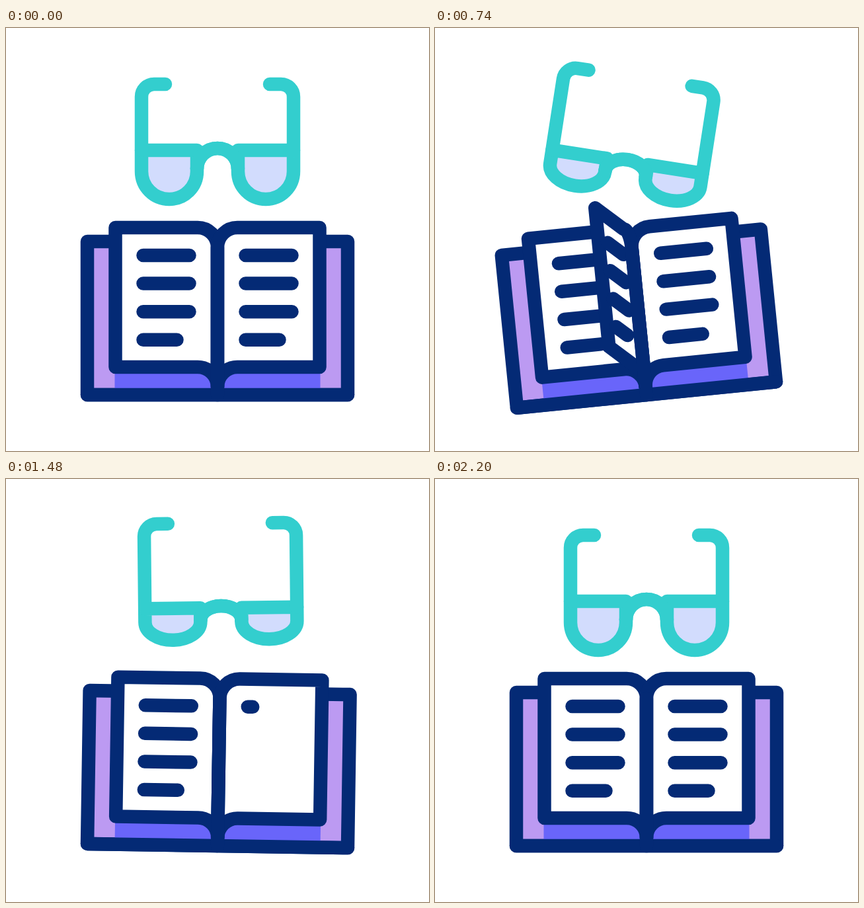
Recreate the animation shown at these times as an HTML page. Size 640 px wide and 640 px high, loop 2400 ms.

```html
<!DOCTYPE html>
<html>
<head>
<meta charset="utf-8">
<title>Book and glasses</title>
<style>
html, body { margin: 0; height: 100%; overflow: hidden; background: #fff; }
svg { display: block; width: 100vw; height: 100vh; }
path { stroke-width: 20.5; stroke-linecap: round; stroke-linejoin: round; fill: none; }
#book path { stroke: #042a75; }
#glasses path { stroke: #33cece; }
#book .paper { fill: #fff; }
#glasses #lens { fill: #d2dcfd; }
</style>
</head>
<body>
<svg viewBox="0 0 640 640">
  <g id="book">
    <path d="M123 323H517V555H123Z" fill="#bc9af2" style="fill:#bc9af2"/>
    <rect x="164.5" y="500" width="311" height="55" fill="#6965fa"/>
    <path d="M123 555H517"/>
    <path id="left" class="paper"/>
    <path id="right" class="paper"/>
    <path id="leftText"/>
    <path id="rightText"/>
    <path id="flap" class="paper"/>
    <path id="flapText"/>
    <path d="M320 332V555"/>
  </g>
  <g id="glasses">
    <g id="half">
      <path id="lens"/>
      <path id="frame"/>
    </g>
    <use href="#half" transform="scale(-1 1)"/>
  </g>
</svg>
<script>
const $ = id => document.getElementById(id);
const draw = (id, d) => $(id).setAttribute('d', d);
const clamp = u => Math.min(1, Math.max(0, u));
const smooth = u => u * u * (3 - 2 * u);
const ramp = (t, a, b) => smooth(clamp((t - a) / (b - a)));

// Eased value between keys placed at the given times
function keys(t, times, values) {
  return times.slice(1).reduce(
    (v, end, i) => v + (values[i + 1] - values[i]) * ramp(t, times[i], end), values[0]);
}

// Page point at distance d from the spine; turn runs from -1 (left) to 1 (right)
function point(turn, d, y) {
  const lift = Math.max(0, d - 30) / 124.5 * 53 * (1 - Math.abs(turn));
  return (320 + d * turn).toFixed(2) + ' ' + (y - lift).toFixed(2) + ' ';
}

function page(turn) {
  const p = (d, y) => point(turn, d, y);
  return 'M' + p(154.5, 302) + 'L' + p(30, 302) +
    'C' + p(13.4, 302) + p(0, 315.4) + p(0, 332) + 'L' + p(0, 543) +
    'C' + p(0, 526.4) + p(13.4, 513) + p(30, 513) + 'L' + p(154.5, 513) + 'Z';
}

// Four text lines; grow gives the drawn share of each
function text(turn, grow = () => 1) {
  const start = turn < 0 ? 112.5 : 42.5, dir = turn < 0 ? -1 : 1;
  return [70, 70, 70, 51].map((length, i) => {
    const share = grow(i), y = 344 + i * 42.6;
    if (share <= 0) return '';
    return 'M' + point(turn, start, y) + 'L' + point(turn, start + dir * length * share, y);
  }).join('');
}

function drawBook(t) {
  const angle = keys(t, [200, 700, 1200, 1700, 2200], [0, -6, 8, -4, 0]);
  $('book').setAttribute('transform', `rotate(${angle} 320 555)`);
  const turn = clamp((t - 400) / 1000) * 2 - 1;
  const turning = turn > -1 && turn < 1;
  draw('flap', turning ? page(turn) : '');
  draw('flapText', turning && turn < 0 ? text(turn) : '');
  draw('rightText', t < 1400 ? text(1) : text(1, i => ramp(t, 1400 + i * 100, 1800 + i * 100)));
}

function drawGlasses(t) {
  const swing = [200, 600, 1200, 1800, 2200];
  const angle = keys(t, swing, [0, 12, -11, 12, 0]);
  const x = 320 + keys(t, swing, [0, -41, 45, -43, 0]);
  const pass = ramp(t, 600, 1200);
  const y = 185 + keys(t, swing, [0, 10, 10, 10, 0]) + 60 * pass * (1 - pass);
  $('glasses').setAttribute('transform', `translate(${x} ${y}) rotate(${angle})`);

  // Tilting shortens the lenses and lengthens the temples
  const tilt = keys(t, [200, 490, 1910, 2200], [0, 1, 1, 0]);
  const k = 1 - 0.35 * tilt, top = 100 + 28 * tilt;
  draw('lens', `M-115 0H-31V${32 * k}A42 ${42 * k} 0 0 1 -115 ${32 * k}Z`);
  draw('frame', `M-79 ${-top}H-96a19 19 0 0 0 -19 19V0` +
    `M-31 ${28 * k}A31 ${28 * k + 3} 0 0 1 31 ${28 * k}`);
}

function tick() {
  const t = performance.now() % 2400;
  drawBook(t);
  drawGlasses(t);
  requestAnimationFrame(tick);
}

draw('left', page(-1));
draw('right', page(1));
draw('leftText', text(-1));
tick();
</script>
</body>
</html>
```
